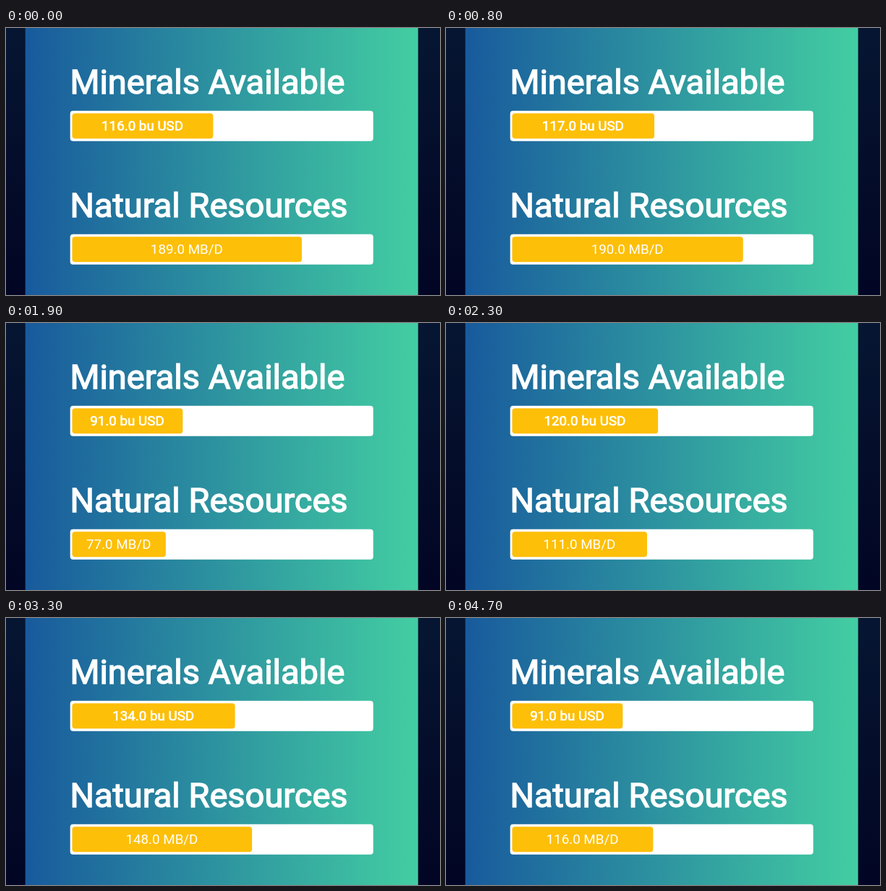
Write an HTML page that moves like this. It is 600 px wide and 370 px high and loops after 4800 ms.

```html
<!DOCTYPE html>
<html lang="en">
<head>
<meta charset="utf-8">
<title>Resource bars</title>
<style>
  html, body { margin: 0; width: 100%; height: 100%; overflow: hidden; }
  svg { display: block; width: 600px; height: 370px; }
  text { font-family: Roboto, sans-serif; font-size: 18.8px; fill: #fff; stroke: #fff; stroke-width: 0; }
  .title { font-size: 47px; stroke-width: 1.4px; }
  .label { text-anchor: middle; }
  .bold { stroke-width: .65px; }
  .track { fill: #fff; }
  .fill { fill: #fdbf07; }
</style>
</head>
<body>
<svg viewBox="0 0 600 370">
  <defs>
    <linearGradient id="night" x2="0" y2="1">
      <stop stop-color="#061632"/>
      <stop offset="1" stop-color="#020524"/>
    </linearGradient>
    <linearGradient id="panel">
      <stop stop-color="#185a9d"/>
      <stop offset="1" stop-color="#43cea2"/>
    </linearGradient>
  </defs>
  <rect width="600" height="370" fill="url(#night)"/>
  <rect x="26.7" width="543" height="370" fill="url(#panel)"/>
  <g>
    <text class="title" x="88.4" y="90.5">Minerals Available</text>
    <rect class="track" x="88.7" y="114.8" width="419" height="42" rx="4"/>
    <rect class="fill" x="91.5" y="118.2" height="35" rx="4"/>
    <text class="label bold" y="141.8"></text>
  </g>
  <g transform="translate(0 171)">
    <text class="title" x="88.4" y="90.5">Natural Resources</text>
    <rect class="track" x="88.7" y="114.8" width="419" height="42" rx="4"/>
    <rect class="fill" x="91.5" y="118.2" height="35" rx="4"/>
    <text class="label" y="141.8"></text>
  </g>
</svg>
<script>
const LOOP = 4800;
const STEP = 100;
const LEFT = 91.5;
const PX_PER_UNIT = 1.68;
const UNITS = ['bu USD', 'MB/D'];

// time in ms, minerals, resources; the bars glide between these and rest on repeats
const readings = [
  [0, 116, 189],
  [800, 117, 190],
  [1400, 205, 75],
  [1900, 91, 77],
  [2100, 91, 77],
  [2700, 177, 180],
  [3000, 177, 180],
  [3600, 91, 116],
  [LOOP, 91, 116]
];

const fills = document.querySelectorAll('.fill');
const labels = document.querySelectorAll('.label');

function setBar(i, value) {
  const width = value * PX_PER_UNIT;
  fills[i].setAttribute('width', width);
  labels[i].setAttribute('x', LEFT + width / 2 - .4);
  labels[i].textContent = `${value.toFixed(1)} ${UNITS[i]}`;
}

function draw(elapsed) {
  const time = Math.floor(elapsed % LOOP / STEP) * STEP;
  const next = readings.findIndex(([at]) => at > time);
  const from = readings[next - 1];
  const to = readings[next];
  const progress = (time - from[0]) / (to[0] - from[0]);
  for (const i of [0, 1]) {
    setBar(i, Math.round(from[i + 1] + (to[i + 1] - from[i + 1]) * progress));
  }
}

const begin = performance.now();
function tick() {
  draw(performance.now() - begin);
  requestAnimationFrame(tick);
}
tick();
</script>
</body>
</html>
```
